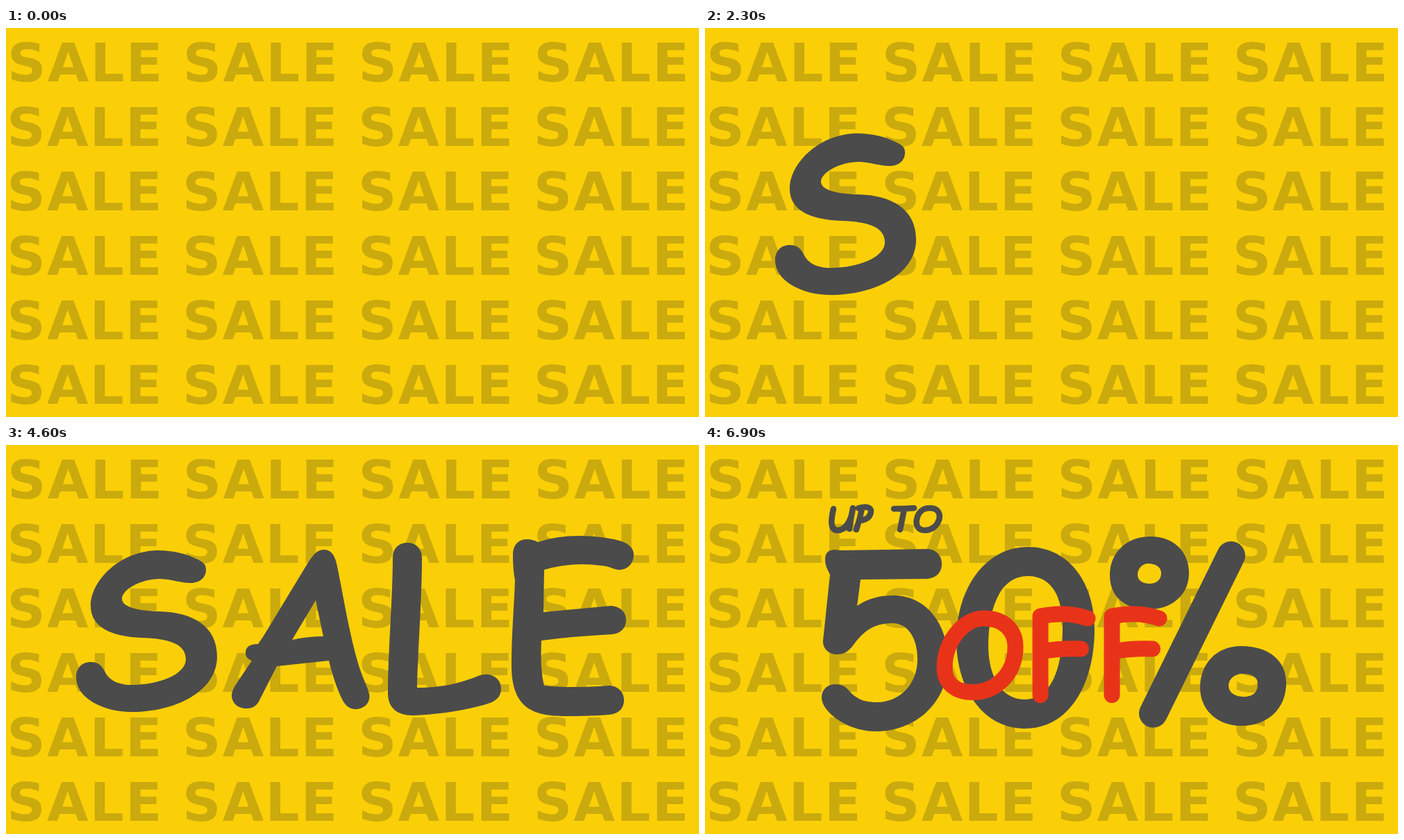
Write an HTML page that moves like this. It is 998 px wide and 561 px high and loops after 7360 ms.

```html
<!DOCTYPE html>
<html lang="en">
<head>
<meta charset="utf-8">
<title>Sale</title>
<style>
  html, body { margin: 0; width: 100%; height: 100%; overflow: hidden; background: #facf08; }
  svg { display: block; width: 100%; height: 100%; }
  #words { font: bold 77px "DejaVu Sans", sans-serif; letter-spacing: 2.2px; fill: #cbaa0d; }
  .ink { fill: #4b4b4b; }
  .line { fill: none; stroke: #4b4b4b; stroke-linecap: round; stroke-linejoin: round; }
  .small { stroke-width: 8.5; }
  .red { stroke: #e93319; stroke-width: 23; }
  [data-on] { opacity: 0; }
</style>
</head>
<body>
<svg viewBox="0 0 998 561" preserveAspectRatio="none">
  <g id="words"></g>

  <g class="ink" fill-rule="evenodd">
    <path data-on="5 6 7 8 10" d="M222 193C240 194 252 199 266 199C280 199 288 190 288 180C288 172 284 169 276 165C260 157 240 152 220 152C165 152 122 195 122 232C122 262 150 276 195 278C235 279 259 287 259 309C259 331 220 346 181 346C160 346 148 338 143 328C138 318 133 313 122 313C109 313 101 322 101 335C101 365 140 385 181 385C245 385 304 355 304 305C304 262 270 241 220 240C185 239 167 232 167 222C167 208 195 193 222 193Z"/>
    <path data-on="6 7 8 10" d="M325 361C325 371 333 380 346 380C354 380 360 377 364 370L390 319L465 311C472 340 482 365 488 373C494 381 502 382 510 380C520 377 525 368 523 359C521 349 515 340 508 318C495 275 488 230 478 180C475 162 470 151 458 151C448 151 443 158 436 168L370 277L363 287C350 287 345 292 345 300C345 306 349 309 354 311L330 347C327 352 325 357 325 361ZM446 224L412 281Q435 276 457 276Z"/>
    <path data-on="7 8 10" d="M557 162C557 148 567 141 578 141C590 141 599 149 599 163C599 220 593 300 592 350C630 350 655 343 683 332C700 327 713 338 713 351C713 362 707 368 697 372C660 384 615 389 586 390C562 390 550 378 550 358C550 300 557 220 557 162Z"/>
    <path data-on="8 10" d="M730 158C730 144 738 136 750 136C757 136 762 138 766 140Q793 131 825 131Q860 131 887 139C898 143 904 150 904 158C904 171 895 180 883 180C876 180 870 175 858 174Q815 168 775 180L774 241L870 232C884 232 893 241 893 252C893 264 885 272 873 273Q815 276 771 282Q769 325 775 347Q815 351 868 347C881 347 890 356 890 368C890 380 882 388 868 389Q840 391 805 391C760 391 728 380 728 318C728 270 732 230 733 195Q730 180 730 158Z"/>
  </g>

  <g class="line small">
    <path data-on="12 13 14 15" d="M185 92C182 105 179 123 191 123C203 123 211 108 213 91Q210 105 208 121M226 92Q223 107 218 122M221 91C237 87 241 92 238 100C235 107 227 109 222 109"/>
    <path data-on="13 14 15" d="M272 92Q287 92 301 91M287 92Q284 107 281 122M323 91C334 90 340 98 337 108C334 117 326 123 317 123C307 123 303 116 305 107C307 97 314 91 323 91Z"/>
  </g>

  <g data-on="14 15">
    <g class="ink" fill-rule="evenodd">
      <path d="M173 165C173 155 178 151 188 151L195 152L320 150C333 150 341 160 341 171C341 185 332 192 320 193L224 194L219 232C235 221 252 217 271 217C320 217 350 260 350 311C350 372 303 413 246 413C205 413 168 385 168 364C168 352 177 345 188 345C205 345 207 357 217 363C225 369 235 371 248 371C280 371 306 345 306 309C306 278 292 257 270 257C240 257 226 272 214 288C206 299 199 302 190 302C178 302 169 293 170 282L180 187C177 180 173 175 173 165Z"/>
      <path d="M465 147C525 147 561 200 561 265C561 345 525 409 460 409C400 409 362 350 362 282C362 205 405 147 465 147ZM465 189C425 189 408 235 408 290C408 330 425 367 460 367C500 367 515 320 515 262C515 220 500 189 465 189Z"/>
      <path d="M642 132C675 132 697 154 697 185C697 217 671 237 639 237C605 237 583 219 583 188C583 155 607 132 642 132ZM638 171C629 171 623 179 623 187C623 195 630 200 640 200C650 200 657 194 657 185C657 176 649 171 638 171Z"/>
      <path d="M772 290C812 290 837 311 837 343C837 381 810 405 772 405C738 405 713 382 713 350C713 315 737 290 772 290ZM774 330C762 330 754 338 754 347C754 357 763 363 776 363C792 363 796 354 796 344C796 335 788 330 774 330Z"/>
    </g>
    <path class="line" stroke-width="41" d="M757.5 159.5L645.5 387"/>
  </g>

  <g class="line red" data-on="15">
    <path d="M402 250C430 250 447 267 447 291C447 329 420 356.5 385 356.5C360 356.5 345 343 345 321C345 286 370 250 402 250Z"/>
    <path id="f" d="M483 247V360.500M483 247Q520 239 551 250M484 298Q510 293 541.500 294"/>
    <use href="#f" x="103"/>
  </g>
</svg>

<script>
  const STEP = 460, COUNT = 16;

  // "column,row" of the lit words in each step
  const lit = {
    1: ["1,3", "2,2"],
    2: ["3,0", "0,5"],
    3: ["0,0", "2,1", "3,2", "1,3", "2,4"]
  };

  function play(el, prop, off, on, steps) {
    const frames = Array.from({ length: COUNT + 1 }, (_, i) => ({
      [prop]: steps.includes(i) ? on : off,
      offset: i / COUNT,
      easing: "step-end"
    }));
    const anim = el.animate(frames, { duration: STEP * COUNT, iterations: Infinity });
    anim.startTime = 0;
  }

  const words = document.getElementById("words");
  for (let row = 0; row < 6; row++) {
    for (let col = 0; col < 4; col++) {
      const word = document.createElementNS("http://www.w3.org/2000/svg", "text");
      word.textContent = "SALE";
      word.setAttribute("x", (row ? 1.3 : 2) + col * 252.8);
      word.setAttribute("y", 76.8 + row * 93.1);
      words.append(word);
      const steps = Object.keys(lit).filter(k => lit[k].includes(col + "," + row)).map(Number);
      if (steps.length) play(word, "fill", "#cbaa0d", "#4c4b4a", steps);
    }
  }

  for (const el of document.querySelectorAll("[data-on]")) {
    play(el, "opacity", 0, 1, el.dataset.on.split(" ").map(Number));
  }
</script>
</body>
</html>
```
